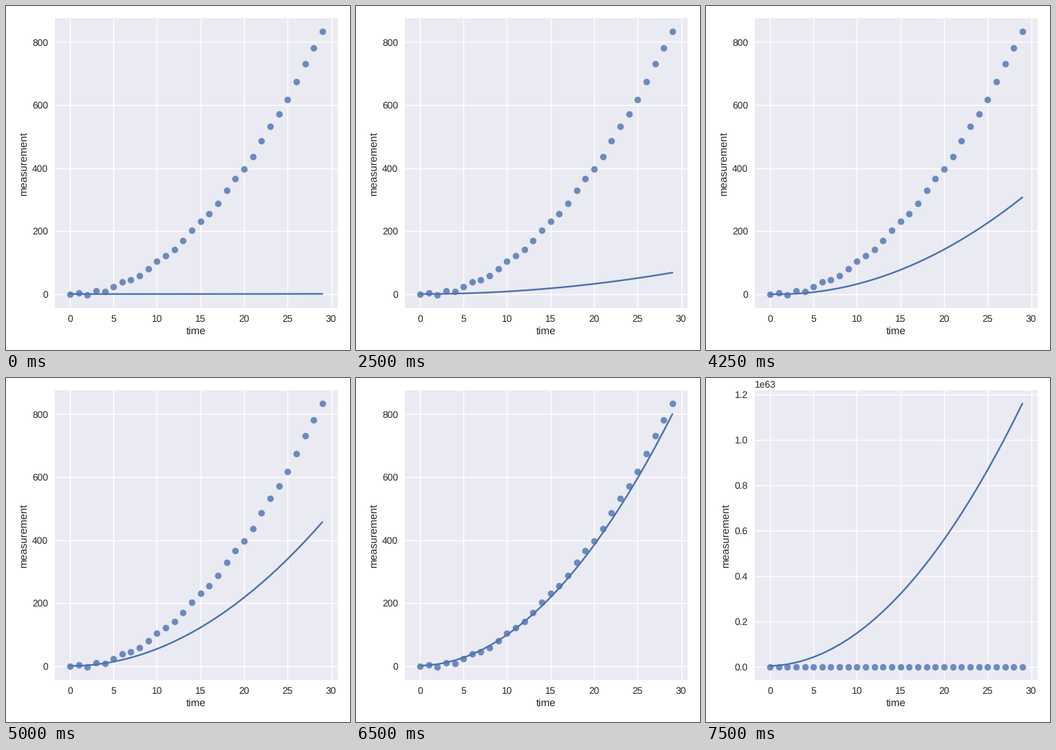
A matplotlib script for the animation above (7.75 s loop, 500 px wide and 500 px high).

```python
import numpy as np
import matplotlib.pyplot as plt
from matplotlib.animation import FuncAnimation

SIZE = 500
TICKS = 31
LAST = 29
BLUE = "#4C72B0"
INK = "#262626"

plt.rcParams.update({
    "font.family": "Liberation Sans",
    "text.hinting": "no_hinting",
    "axes.labelcolor": INK,
})


def wave(t, peak, period):
    return np.cos(2 * np.pi * (t - peak) / period)


def measure(t):
    """A parabola with a slow drift, a fast ripple and an early jolt."""
    drift = 3 * wave(t, 15.5, 22)
    ripple = 5 * np.tanh(t) * wave(t, 10, 4.25)
    jolt = 9.7 * np.exp(-(t - 2.5)**2) * np.sin(np.pi * (t - 2.5))
    return t**2 + drift + ripple + jolt


# Key points of the curve's scale, joined by geometric growth: (step, scale)
STEPS, SCALES = zip((0, 6.5e-4), (12, 0.404), (16, 0.39), (23, 0.849),
                    (26, 0.98), (27, 4.05), (LAST, 1.335e60))


def fit(t, step):
    scale = np.exp(np.interp(step, STEPS, np.log(SCALES)))
    dip = -1.9 * np.exp(-(step - 16)**2 / 4)
    rise = 0.88 * (step / LAST)**4
    return scale * (t**2 + dip * (t + 0.5) + rise * (t + 2.7))


time = np.arange(LAST + 1)
measured = measure(time)

fig = plt.figure(figsize=(SIZE / 100, SIZE / 100), dpi=100, facecolor="white")
box = np.array([70.9, 61.15, 411, 421]) / SIZE
ax = fig.add_axes(box, facecolor="#EAEAF2")
ax.set_axisbelow(True)
ax.grid(color="white", linewidth=1)
ax.spines[:].set_visible(False)
ax.tick_params(length=0, pad=7, labelsize=10, labelcolor=INK)
ax.set_xlabel("time", fontsize=11)
ax.set_ylabel("measurement", fontsize=11)

ax.scatter(time, measured, s=47, color=BLUE, alpha=0.8, linewidth=0)
line, = ax.plot(time, fit(time, 0), color=BLUE, linewidth=1.75,
                solid_capstyle="round")
ax.set_xlim(-0.06 * LAST, 1.06 * LAST)


def draw(i):
    y = fit(time, max(i - 1, 0))  # the first state lasts two ticks
    line.set_ydata(y)
    low = min(measured.min(), y.min())
    high = max(measured.max(), y.max())
    pad = 0.05 * (high - low)
    ax.set_ylim(low - pad, high + pad)
    return line,


anim = FuncAnimation(fig, draw, frames=TICKS, interval=250, repeat=True)
plt.show()
```
